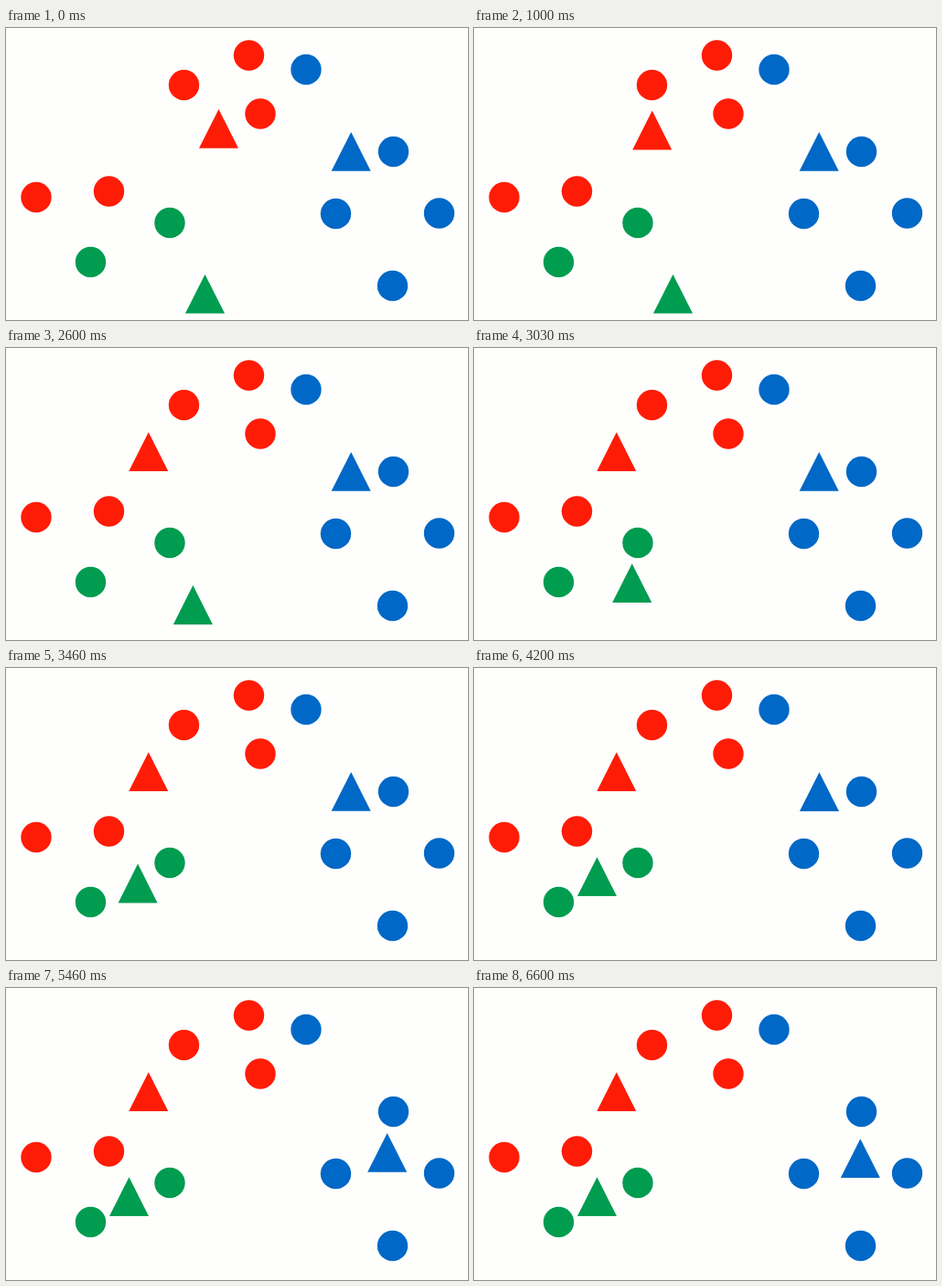
An HTML page that plays this animation: 505 by 320 pixels, repeating every 7000 ms.

```html
<!DOCTYPE html>
<html lang="en">
<head>
<meta charset="utf-8">
<title>Centroids moving to their clusters</title>
<style>
  html, body { margin: 0; width: 100%; height: 100%; overflow: hidden; background: #fefefd; }
  svg { display: block; width: 505px; height: 320px; }
</style>
</head>
<body>
<svg id="stage" viewBox="0 0 505 320"></svg>
<script>
const LOOP = 7000, MOVE = 1800;

// Each cluster: points, and the apex of its centroid triangle before and after the move.
const clusters = [
  { color: '#ff1c06', start: 108, from: [232.5, 89], to: [155.8, 92.2],
    points: [[265.5, 30], [194.5, 62.5], [278, 94], [33, 185.5], [112.5, 179]] },
  { color: '#009c50', start: 2095, from: [217.5, 270], to: [134.5, 207.3],
    points: [[179, 213.5], [92.5, 256.5]] },
  { color: '#0068c6', start: 4110, from: [377.2, 114], to: [422.3, 165.3],
    points: [[328, 45.5], [423.5, 135.5], [360.5, 203.5], [473.5, 203], [422.5, 282.5]] }
];

const stage = document.getElementById('stage');

function add(tag, attrs) {
  const el = document.createElementNS('http://www.w3.org/2000/svg', tag);
  for (const key in attrs) el.setAttribute(key, attrs[key]);
  return stage.appendChild(el);
}

for (const c of clusters) {
  for (const [cx, cy] of c.points) add('circle', { cx, cy, r: 16.7, fill: c.color });
}
for (const c of clusters) {
  c.marker = add('path', { d: 'M0 0L21.5 42.8H-21.5Z', fill: c.color });
}

// Constant acceleration, then constant deceleration.
const ease = p => p < 0.5 ? 2 * p * p : 1 - 2 * (1 - p) ** 2;

function draw() {
  const time = performance.now() % LOOP;
  for (const { start, from, to, marker } of clusters) {
    const k = ease(Math.min(1, Math.max(0, (time - start) / MOVE)));
    const [x, y] = from.map((v, i) => v + (to[i] - v) * k);
    marker.setAttribute('transform', `translate(${x} ${y})`);
  }
  requestAnimationFrame(draw);
}
draw();
</script>
</body>
</html>
```
